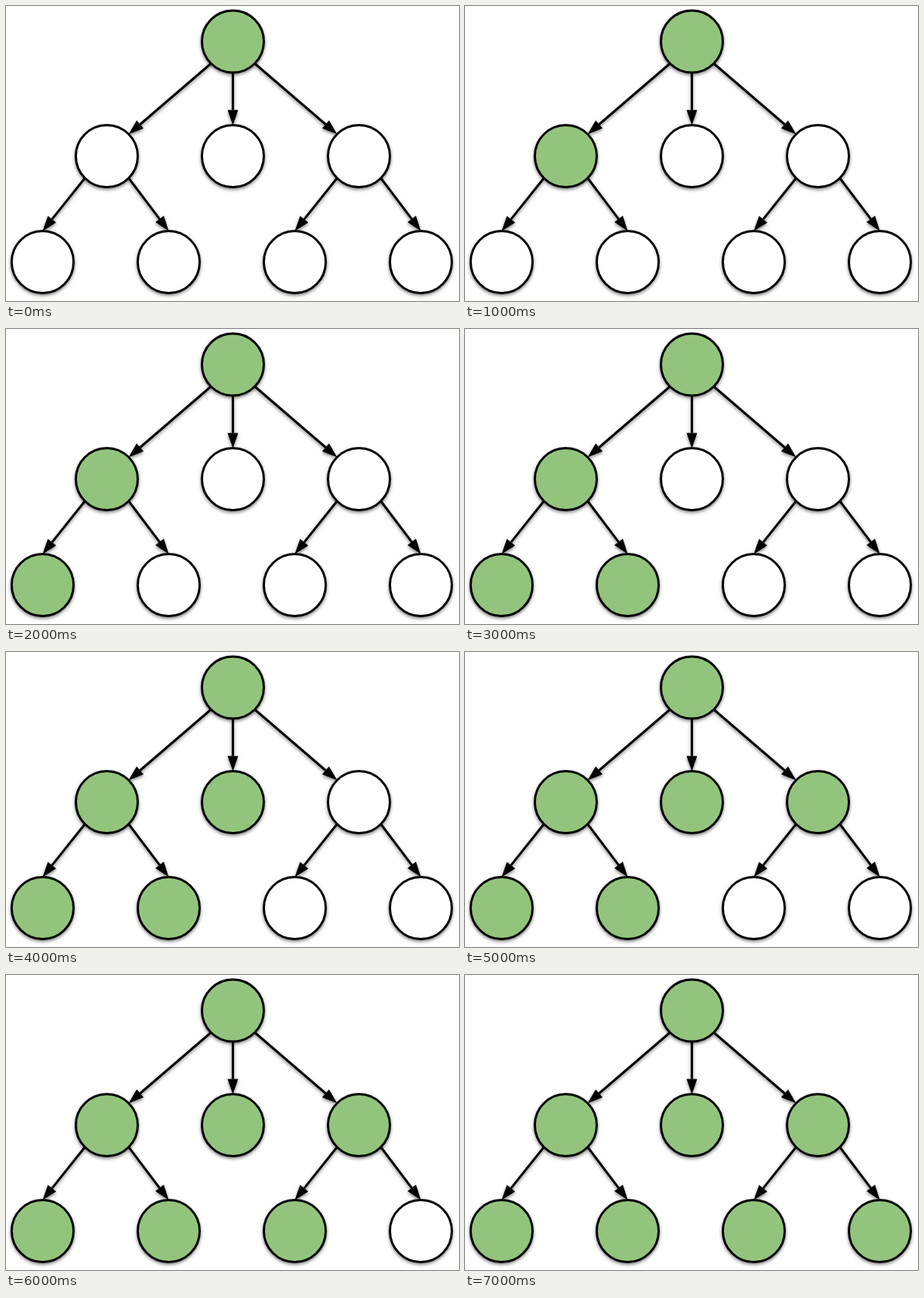
An HTML page that plays this animation: 600 by 390 pixels, repeating every 8 s.

```html
<!DOCTYPE html>
<html lang="en">
<head>
<meta charset="utf-8">
<title>Depth-first traversal</title>
<style>
  html, body { margin: 0; width: 100%; height: 100%; overflow: hidden; background: #fff; }
  svg { display: block; width: 600px; height: 390px; }
  .tree { filter: drop-shadow(0 2px 2px rgba(0, 0, 0, .5)); }
  circle { fill: #fff; stroke: #000; stroke-width: 3; }
  line { stroke: #000; stroke-width: 3; }
</style>
</head>
<body>
<svg viewBox="0 0 600 390"><g class="tree"></g></svg>
<script>
const STEP = 1000;
const RADIUS = 41;
const SPACING = 167;
const VISITED = '#93c47d';

// Each level is a row of evenly spaced slots.
const levels = [{ x: 300.5, y: 47 }, { x: 133.5, y: 198.5 }, { x: 48.5, y: 338.5 }];
const usedSlots = levels.map(() => 0);
const family = [[[], []], [], [[], []]];

const tree = document.querySelector('.tree');

function add(tag, attrs) {
  const el = document.createElementNS('http://www.w3.org/2000/svg', tag);
  for (const [key, value] of Object.entries(attrs)) el.setAttribute(key, value);
  return tree.appendChild(el);
}

// Anchor on the rim: straight above or below, or at 45 degrees to a side.
function rim({ x, y }, side, vertical) {
  const reach = RADIUS / Math.hypot(side, vertical);
  return [x + side * reach, y + vertical * reach];
}

function addArrow([x1, y1], [x2, y2], length = 20, half = 7) {
  const angle = Math.atan2(y2 - y1, x2 - x1) * 180 / Math.PI;
  const distance = Math.hypot(x2 - x1, y2 - y1);
  const transform = `translate(${x2} ${y2}) rotate(${angle})`;
  add('line', { x1: -distance, x2: -length, transform });
  add('path', { d: `M0 0L${-length} ${-half}V${half}Z`, transform });
}

// Lays the tree out in the order it is visited, parents before children.
function layOut(children, depth = 0, parent = null) {
  const { x, y } = levels[depth];
  const node = { x: x + SPACING * usedSlots[depth]++, y };
  const circle = add('circle', { cx: node.x, cy: node.y, r: RADIUS });
  if (parent) {
    const side = Math.sign(node.x - parent.x);
    const entrySide = children.length ? -side : 0;
    addArrow(rim(parent, side, 1), rim(node, entrySide, -1));
  }
  return [circle, ...children.flatMap(child => layOut(child, depth + 1, node))];
}

const circles = layOut(family);
const start = performance.now();

function draw(now) {
  const current = Math.floor(Math.max(0, now - start) / STEP) % circles.length;
  circles.forEach((circle, i) => { circle.style.fill = i <= current ? VISITED : '#fff'; });
  requestAnimationFrame(draw);
}
draw(start);
</script>
</body>
</html>
```
